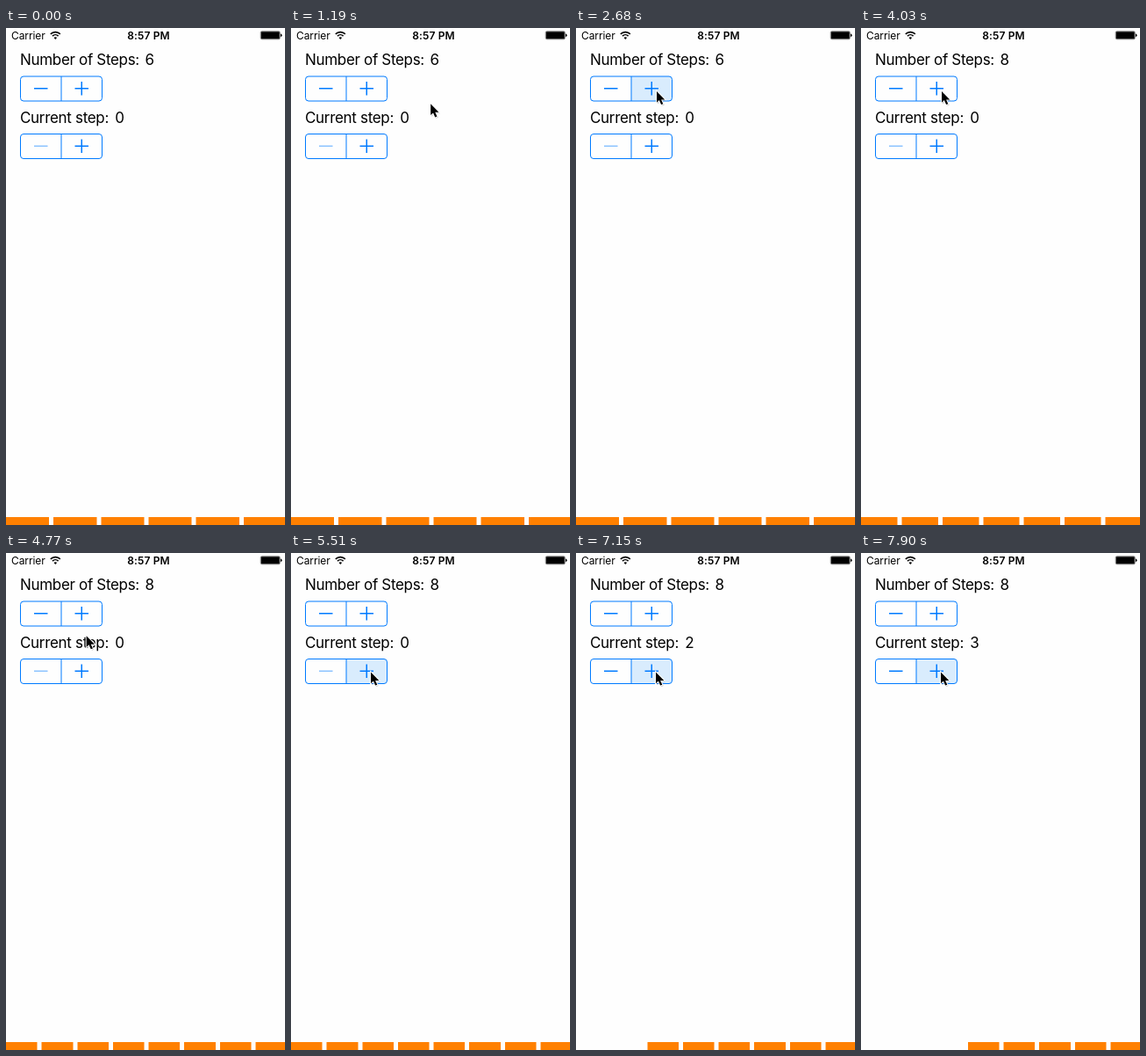
These frames come from a looping animation (318 by 565 pixels, 8 s). An HTML page:

```html
<!DOCTYPE html>
<html lang="en">
<head>
<meta charset="utf-8">
<title>Step bar</title>
<style>
  html, body { margin: 0; width: 100%; height: 100%; overflow: hidden; background: #fefefe; }
  svg { display: block; width: 318px; height: 565px; font-family: Inter, Roboto, sans-serif; }
  .label { font-size: 17px; letter-spacing: -.32px; }
  .status { font-size: 12px; }
  .line { fill: none; stroke: #007aff; }
  .sign { stroke-width: 1.5; }
  .hit { fill: #d9ecfd; }
</style>
</head>
<body>
<svg viewBox="0 0 318 565">
  <defs>
    <clipPath id="round"><rect x="16.5" y=".5" width="93" height="28" rx="3.5"/></clipPath>
  </defs>

  <text class="status" x="6" y="12.6" letter-spacing="-.08">Carrier</text>
  <g fill="none" stroke="#000" stroke-width="1.7">
    <path d="M50.8 6.9a7.8 7.8 0 0 1 11 0"/>
    <path d="M53 9.1a4.7 4.7 0 0 1 6.6 0"/>
  </g>
  <path d="M56.3 12.9l-1.8-1.9a2.6 2.6 0 0 1 3.6 0z"/>
  <text class="status" x="162.5" y="12.6" text-anchor="middle" font-weight="600" letter-spacing=".15">8:57 PM</text>
  <rect x="290.25" y="3.75" width="22" height="9" rx="1.5" fill="none" stroke="#000" stroke-width=".5"/>
  <rect x="290.75" y="4.25" width="21" height="8" rx=".8"/>
  <path d="M313 6.5q1.5 .3 1.5 1.8t-1.5 1.8z"/>

  <text class="label" x="16" y="42">Number of Steps:</text>
  <text class="label" id="label0" x="158.5" y="42"></text>
  <text class="label" x="16" y="107.5">Current step:</text>
  <text class="label" id="label1" x="124.3" y="107.5"></text>

  <g id="steppers"></g>
  <g id="bars" fill="#ff8000"></g>

  <g id="cursor">
    <path d="M1 1.5v13l3-2.7 2.4 4.7 2.4-1-2.2-4.6h4.4z" opacity=".2"/>
    <path d="M0 0v12.8l2.9-2.7 2.2 5 2.2-.9-2.2-4.8h4.2z" stroke="#fff" stroke-width="1.8" paint-order="stroke"/>
  </g>
</svg>
<script>
const LOOP = 8000, TICK = 149, LEAD = 12;
const SPAN = 325, GAP = 5, FIRST = 6, MAX = 8;
const $ = id => document.getElementById(id);

$('steppers').innerHTML = [54.5, 120].map((y, i) => `
  <g transform="translate(0 ${y})">
    <rect class="hit" id="hit${i}" x="63" width="47" height="29" clip-path="url(#round)"/>
    <path class="line" d="M63 .5v28"/>
    <rect class="line" x="16.5" y=".5" width="93" height="28" rx="3.5"/>
    <path class="line sign" id="minus${i}" d="M32 14.25h15.5"/>
    <path class="line sign" d="M78.5 14.25h15.5M86.25 6.5v15.5"/>
  </g>`).join('');
$('bars').innerHTML = '<rect y="556" height="9"/>'.repeat(MAX);
const bars = [...$('bars').children];

// Taps on the two plus buttons, in ticks; a quick tap shows no highlight and moves the bars late.
const taps = [
  { row: 0, at: 18 }, { row: 0, at: 26, quick: true },
  { row: 1, at: 37 }, { row: 1, at: 43 }, { row: 1, at: 48 }, { row: 1, at: 53 }
];
const CORNER = [282, 112.5], PLUS0 = [92, 72], PLUS1 = [91, 135.5];

const clamp = v => Math.min(1, Math.max(0, v));
const snap = v => Math.round(v * 2) / 2;
const easeOut = u => 1 - (1 - u) ** 1.5;
const mix = (a, b, u) => a.map((v, i) => v + (b[i] - v) * u);
const sum = (row, f) => taps.reduce((n, tap) => n + (tap.row === row ? f(tap) : 0), 0);
const show = (el, on) => el.setAttribute('visibility', on ? 'visible' : 'hidden');

function cursorAt(k) {
  const arrive = easeOut(clamp((k - 4) / 8)), descend = easeOut(clamp((k - 31) / 4));
  return mix(mix(CORNER, PLUS0, arrive), PLUS1, descend);
}

function draw(t) {
  const k = Math.floor((t + LEAD) / TICK);
  const pressed = row => sum(row, tap => +(k > tap.at));
  const moved = row => sum(row, tap => clamp((k - tap.at - (tap.quick ? 1 : 0)) / 2));
  const lit = row => sum(row, tap => +(!tap.quick && k >= tap.at && k < tap.at + 2));
  const pitch = SPAN / (FIRST + moved(0)), gone = moved(1);

  $('label0').textContent = FIRST + pressed(0);
  $('label1').textContent = pressed(1);
  $('minus1').setAttribute('opacity', pressed(1) ? 1 : .45);
  for (const row of [0, 1]) show($('hit' + row), lit(row));
  bars.forEach((bar, i) => {
    const x = snap(i * pitch);
    bar.setAttribute('x', x);
    bar.setAttribute('width', snap((i + 1) * pitch) - GAP - x);
    bar.setAttribute('opacity', clamp(i + 1 - gone));
  });
  show($('cursor'), k >= 2);
  $('cursor').setAttribute('transform', `translate(${cursorAt(k)})`);
}

const start = performance.now();
function frame() {
  draw((performance.now() - start) % LOOP);
  requestAnimationFrame(frame);
}
frame();
</script>
</body>
</html>
```
